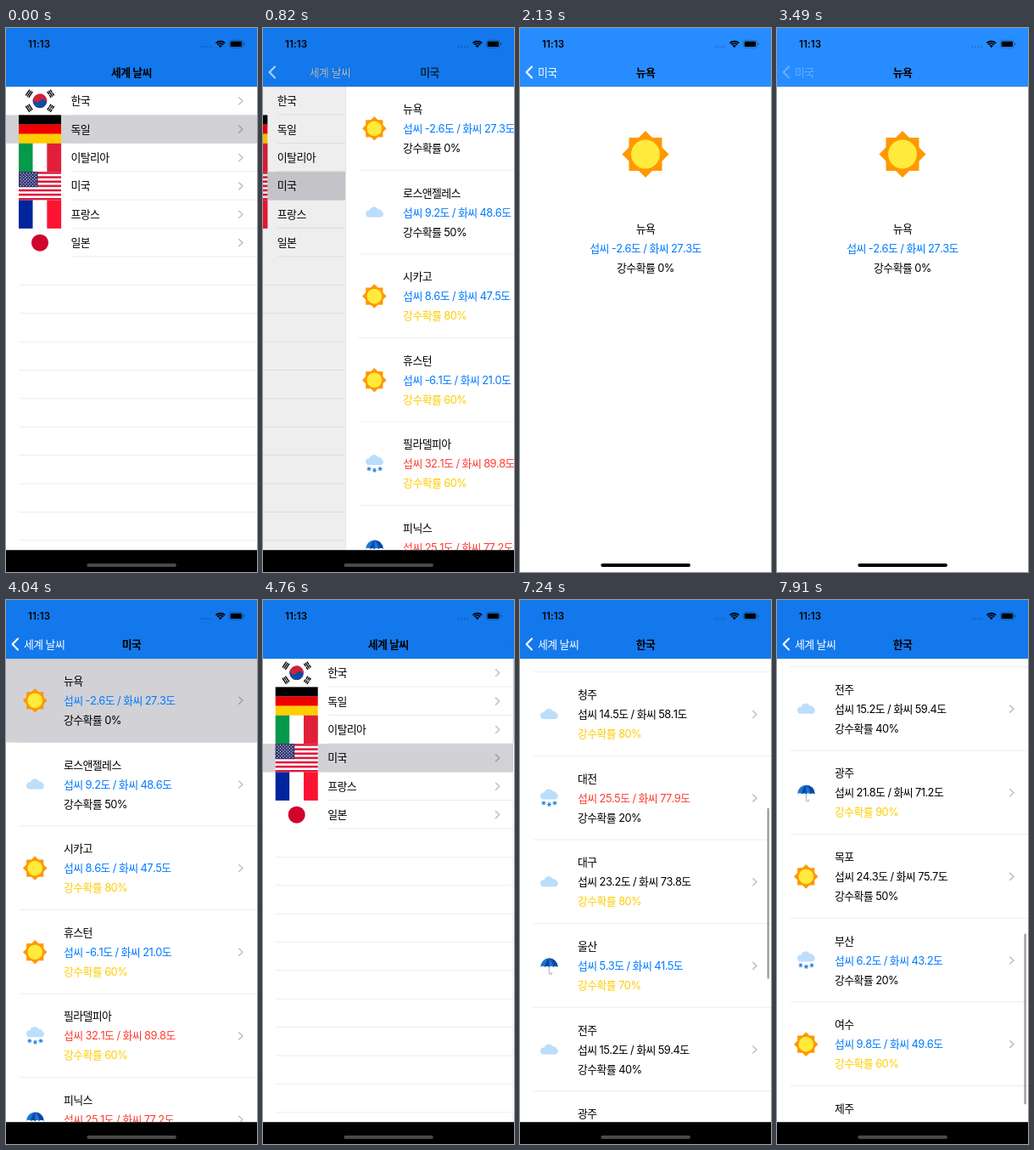
An HTML page for the animation above (8 s loop, 296 by 640 pixels).

```html
<!DOCTYPE html>
<html lang="ko">
<head>
<meta charset="utf-8">
<title>세계 날씨</title>
<style>
  html, body { margin: 0; width: 100%; height: 100%; overflow: hidden; background: #000; }
  svg { display: block; width: 296px; height: 640px; }
  text {
    font: 400 12.9px Inter, "Noto Sans CJK KR", "Noto Sans CJK", sans-serif;
    letter-spacing: -.045em; font-kerning: none; white-space: pre;
  }
  .bold { font-weight: 600; }
  .mid { text-anchor: middle; }
  .clock { font-size: 11.6px; letter-spacing: .01em; }
</style>
</head>
<body>
<svg id="stage" viewBox="0 0 296 640" xmlns="http://www.w3.org/2000/svg"></svg>
<script>
const LOOP = 8000, W = 296, H = 640, TOP = 69, BOTTOM = 614.2;
const ROW = 33.39, CITY = 98.63, VIEW = BOTTOM - TOP;
const GRAY = '#d1d1d6', LINE = '#e8e8ea';

// ---- small drawing helpers
const rect = (x, y, w, h, fill, more = '') =>
  `<rect x="${x}" y="${y}" width="${w}" height="${h}" fill="${fill}" ${more}/>`;
const disc = (x, y, r, fill) => `<circle cx="${x}" cy="${y}" r="${r}" fill="${fill}"/>`;
const path = (d, fill, more = '') => `<path d="${d}" fill="${fill}" ${more}/>`;
const stroke = (d, color, w) =>
  path(d, 'none', `stroke="${color}" stroke-width="${w}" stroke-linecap="round" stroke-linejoin="round"`);
const label = (x, y, s, fill = '#000', cls = '') =>
  `<text x="${x}" y="${y + 4.6}" fill="${fill}" class="${cls}">${s}</text>`;
const group = (s, transform = '', id = '') => `<g id="${id}" transform="${transform}">${s}</g>`;
const range = n => [...Array(n).keys()];
const chevron = y => stroke(`M274.8 ${y - 4}l4.2 4l-4.2 4`, 'rgba(60,60,67,.32)', 1.5);

// ---- flags, 50 by 33.4
const bands = (colors, upright) => colors.map((c, i) => upright
  ? rect(i * 50 / 3, 0, 50 / 3 + .1, ROW, c)
  : rect(0, i * ROW / 3, 50, ROW / 3 + .1, c)).join('');

function trigram(x, y, angle, solid) {
  const bars = solid.map((full, i) => {
    const bar = rect(-2.8 + i * 2.1, -4.1, 1.4, 8.2, '#000');
    return full ? bar : bar + rect(-2.9 + i * 2.1, -.4, 1.6, .8, '#fff');
  });
  return group(bars.join(''), `translate(${x} ${y}) rotate(${angle})`);
}

function korea() {
  const r = 8.4, h = r / 2, a = 33.7;
  const swirl = disc(0, 0, r, '#d2203a') +
    path(`M${-r} 0A${h} ${h} 0 0 0 0 0A${h} ${h} 0 0 1 ${r} 0A${r} ${r} 0 0 1 ${-r} 0Z`, '#0b4ea2');
  return rect(0, 0, 50, ROW, '#fff') + group(swirl, `translate(25 16.7) rotate(${a})`) +
    trigram(12.3, 8.2, a, [1, 1, 1]) + trigram(37.7, 25.2, a, [0, 0, 0]) +
    trigram(37.7, 8.2, -a, [0, 1, 0]) + trigram(12.3, 25.2, -a, [1, 0, 1]);
}

function america() {
  const s = ROW / 13;
  let out = rect(0, 0, 50, ROW, '#fff');
  for (let i = 0; i < 13; i += 2) out += rect(0, i * s, 50, s, '#e0183c');
  out += rect(0, 0, 22.5, 7 * s, '#2f3470');
  for (let j = 0; j < 9; j++)
    for (let i = 0; i < 6 - j % 2; i++)
      out += disc(2.1 + i * 3.65 + j % 2 * 1.82, 1.8 + j * 1.8, .62, '#fff');
  return out;
}

const countries = [
  ['한국', korea()],
  ['독일', bands(['#000', '#f00000', '#ffce00'])],
  ['이탈리아', bands(['#07994a', '#fff', '#e0203a'], true)],
  ['미국', america()],
  ['프랑스', bands(['#00249c', '#fff', '#fb1432'], true)],
  ['일본', rect(0, 0, 50, ROW, '#fff') + disc(25, 16.7, 10, '#d0052c')]
];

// ---- weather icons, centred on 0,0
const cloud = '<g fill="#bbdefb" transform="translate(0 -.4)">' +
  '<circle cx="-6.2" cy="2" r="4"/><circle cx="-.4" cy="-.8" r="5.4"/>' +
  '<circle cx="5" cy="0" r="3.4"/><circle cx="6.8" cy="2.2" r="3.8"/>' +
  '<rect x="-6.2" y="0" width="13" height="6"/></g>';
const flake = (x, y) =>
  stroke(`M${x - 2.1} ${y}h4.2M${x - 1.1} ${y - 1.9}l2.2 3.8M${x + 1.1} ${y - 1.9}l-2.2 3.8`, '#2a86e0', 1.1);
const icons = {
  sun: rect(-10.1, -10.1, 20.2, 20.2, '#ff9800') +
    rect(-10.1, -10.1, 20.2, 20.2, '#ff9800', 'transform="rotate(45)"') + disc(0, 0, 8.8, '#ffeb3b'),
  cloud,
  snow: group(cloud, 'translate(0 -4.2)') + flake(-6.3, 5.8) + flake(.2, 7.4) + flake(6.8, 5.8),
  rain: stroke('M.2 0V8.4a1.6 1.6 0 0 0 3.2 0V8', '#b4bcc8', 1.2) +
    path('M-10 1.4A10.2 10.4 0 0 1 10.4 1.4Q7.4 -.6 5 1.4Q2.6 -.4 .2 1.4Q-2.2 -.4 -4.8 1.4Q-7.4 -.6 -10 1.4Z', '#1976d2') +
    path('M.2 -8.9Q9.6 -8.2 10.4 1.4Q7.4 -.6 5 1.4Q4.6 -5 .2 -8.9Z', '#0d47a1') +
    path('M.2 -8.9Q-4.4 -5.2 -4.8 1.4Q-2.2 -.4 .2 1.4Z', '#0d47a1')
};

// ---- city lists: name, icon, celsius, chance of rain
const usa = [
  ['뉴욕', 'sun', -2.6, 0], ['로스앤젤레스', 'cloud', 9.2, 50], ['시카고', 'sun', 8.6, 80],
  ['휴스턴', 'sun', -6.1, 60], ['필라델피아', 'snow', 32.1, 60], ['피닉스', 'rain', 25.1, 40]
];
const home = [
  ['서울', 'rain', 17.8, 60], ['춘천', 'sun', 8.5, 20], ['강릉', 'snow', 14.3, 30],
  ['천안', 'snow', 26.5, 50], ['세종', 'snow', 24.8, 60], ['청주', 'cloud', 14.5, 80],
  ['대전', 'snow', 25.5, 20], ['대구', 'cloud', 23.2, 80], ['울산', 'rain', 5.3, 70],
  ['전주', 'cloud', 15.2, 40], ['광주', 'rain', 21.8, 90], ['목포', 'sun', 24.3, 50],
  ['부산', 'snow', 6.2, 20], ['여수', 'sun', 9.8, 60], ['제주', 'cloud', 12.4, 30]
];

function facts([name, , c, rain], x, y, cls) {
  const f = (c * 1.8 + 32).toFixed(1);
  const heat = c < 10 ? '#007aff' : c >= 25 ? '#ff3b30' : '#000';
  return label(x, y - 23, name, '#000', cls) +
    label(x, y, `섭씨 ${c.toFixed(1)}도 / 화씨 ${f}도`, heat, cls) +
    label(x, y + 23, `강수확률 ${rain}%`, rain >= 60 ? '#ffcc00' : '#000', cls);
}

// ---- pages
const page = (id, body, back = '#000') => group(
  rect(0, 0, W, H, back) + rect(0, TOP, W, VIEW, '#fff') +
  `<g clip-path="url(#table)">${body}</g>` +
  rect(0, 0, W, H, '#000', `id="${id}Dim" opacity="0"`), '', id);

function countryPage() {
  const lines = range(16).map(i => {
    const x = i < countries.length ? 77 : 15;
    return rect(x, TOP + (i + 1) * ROW - .8, W - x, .8, LINE);
  });
  const rows = countries.map(([name, flag], i) => {
    const y = TOP + i * ROW, mid = y + ROW / 2;
    return group(flag, `translate(15 ${y})`) + label(76.5, mid, name) + chevron(mid);
  });
  return page('root', lines.join('') + rect(0, 0, W, ROW, GRAY, 'id="rootPick"') + rows.join(''));
}

function cityPage(id, list) {
  const rows = list.map((city, i) => {
    const y = i * CITY, mid = y + CITY / 2;
    return rect(15.5, y + CITY - .8, W, .8, LINE) +
      (i ? '' : rect(0, 0, W, CITY, GRAY, `id="${id}Pick" opacity="0"`)) +
      group(icons[city[1]], `translate(34.2 ${mid})`) + facts(city, 68, mid, '') + chevron(mid);
  });
  const thumb = rect(291.5, 0, 2.3, VIEW * VIEW / (list.length * CITY), '#000',
    `id="${id}Thumb" rx="1.15" fill-opacity=".4" opacity="0"`);
  return page(id, group(rows.join(''), `translate(0 ${TOP})`, id + 'Rows') + thumb);
}

const detailPage = () => page('ny',
  group(icons.sun, 'translate(148 148.5) scale(1.93)') + facts(usa[0], 148, 259, 'mid'), '#fff');

function statusBar() {
  const arc = r => path(`M${-r * .7} ${-r * .7}A${r} ${r} 0 0 1 ${r * .7} ${-r * .7}`, 'none',
    'stroke="#000" stroke-width="1.9"');
  return label(26, 18.6, '11:13', '#000', 'bold clock') +
    range(4).map(i => disc(230.5 + i * 3.6, 22, .85, 'rgba(0,0,0,.32)')).join('') +
    group(arc(7.6) + arc(4.9) + path('M0 0L-2.1 -2.1A3 3 0 0 1 2.1 -2.1Z', '#000'), 'translate(252.8 23.2)') +
    rect(263.4, 14.4, 16, 8.8, 'none', 'rx="2.6" stroke="#000" stroke-opacity=".32" stroke-width=".75"') +
    rect(264.7, 15.7, 13.4, 6.2, '#000', 'rx="1.5"') +
    path('M280.4 17.3q1.3 .5 1.3 1.5t-1.3 1.5z', 'rgba(0,0,0,.38)');
}

const title = (id, s) => group(label(148, 52, s, '#000', 'bold mid'), '', id + 'Title');
const back = (id, s) => group(label(21, 52, s, '#fff'), '', id + 'Back');

const stage = document.getElementById('stage');
stage.innerHTML =
  `<defs><clipPath id="table">${rect(0, TOP, W, VIEW, '#fff')}</clipPath></defs>` +
  countryPage() + cityPage('us', usa) + cityPage('kr', home) + detailPage() +
  rect(0, 0, W, TOP, 'rgba(21,131,255,.92)') + rect(0, TOP, W, .3, 'rgba(0,0,0,.3)') + statusBar() +
  title('root', '세계 날씨') + title('us', '미국') + title('kr', '한국') + title('ny', '뉴욕') +
  back('us', '세계 날씨') + back('kr', '세계 날씨') + back('ny', '미국') +
  group(stroke('M14 45.6L7.6 52L14 58.4', '#fff', 2.1), '', 'arrow') +
  rect(95.4, 630.1, 105.5, 3.8, '#4a4a4a', 'id="bar" rx="1.9"');

const el = {};
stage.querySelectorAll('[id]').forEach(e => e.id && (el[e.id] = e));
const move = (id, x, y = 0) => el[id].setAttribute('transform', `translate(${x} ${y})`);
const fade = (id, o) => el[id].setAttribute('opacity', o);
const place = (id, x, o) => { move(id, x); fade(id, o); };

// ---- motion: start, end, pictures, delay, time of settling
const moves = {
  us: { push: [500, 1040, 6, 80], pop: [4200, 4760, 6, 100, 5200] },
  ny: { push: [1680, 2130, 5, 20], pop: [3490, 4040, 6, 80] },
  kr: { push: [5200, 5760, 6, 70, 6900] }
};

const spring = ms => 1 - (1 + .017 * ms) * Math.exp(-.017 * ms);

function run(t, [a, b, n, delay, settle = b]) {
  if (t < a) return 0;
  if (t >= settle) return 1;
  const step = (b - a) / (n - 1);
  const ms = Math.floor((Math.min(t, b) - a) / step + 1e-6) * step;
  return spring(Math.max(0, ms - delay));
}

const shown = (t, { push, pop }) => run(t, push) - (pop ? run(t, pop) : 0);

// A flick: dragged for three pictures, then slowing down.
function scrolled(t) {
  if (t < 6900) return 0;
  const k = Math.floor((t - 6900) / 112);
  return k < 3 ? [20, 165, 329][k] : 477 + 543 * (1 - Math.exp(-(k - 3) * .2234));
}

function draw(t) {
  const us = shown(t, moves.us), ny = shown(t, moves.ny), kr = shown(t, moves.kr);
  const deep = Math.max(us, kr);

  move('root', -.3 * W * deep);
  move('us', W * (1 - us) - .3 * W * ny);
  move('kr', W * (1 - kr));
  move('ny', W * (1 - ny));
  fade('rootDim', .1 * deep);
  fade('usDim', .1 * ny);

  const pick = t < 500 ? 1 : t < 5200 ? 3 : 0;
  el.rootPick.setAttribute('y', TOP + pick * ROW);
  fade('usPick', t >= 1680 ? 1 : 0);

  const y = scrolled(t);
  move('krRows', 0, TOP - y);
  move('krThumb', 0, TOP + y / (home.length * CITY) * VIEW);
  fade('krThumb', t >= 6900 ? 1 : 0);

  const pressed = (t >= 3490 && t < 3600) || (t >= 4200 && t < 4312) ? .3 : 1;
  place('rootTitle', -103 * deep, 1 - deep);
  place('usTitle', 148 * (1 - us) - 103 * ny, us * (1 - ny));
  place('krTitle', 148 * (1 - kr), kr);
  place('nyTitle', 148 * (1 - ny), ny);
  place('usBack', 103 * (1 - us) - 60 * ny, us * (1 - ny) * pressed);
  place('krBack', 103 * (1 - kr), kr);
  place('nyBack', 103 * (1 - ny), ny * pressed);
  fade('arrow', deep * pressed);

  const g = Math.round(74 * (1 - ny));
  el.bar.setAttribute('fill', `rgb(${g},${g},${g})`);
}

const start = performance.now();
function tick() {
  draw((performance.now() - start) % LOOP);
  requestAnimationFrame(tick);
}
tick();
</script>
</body>
</html>
```
